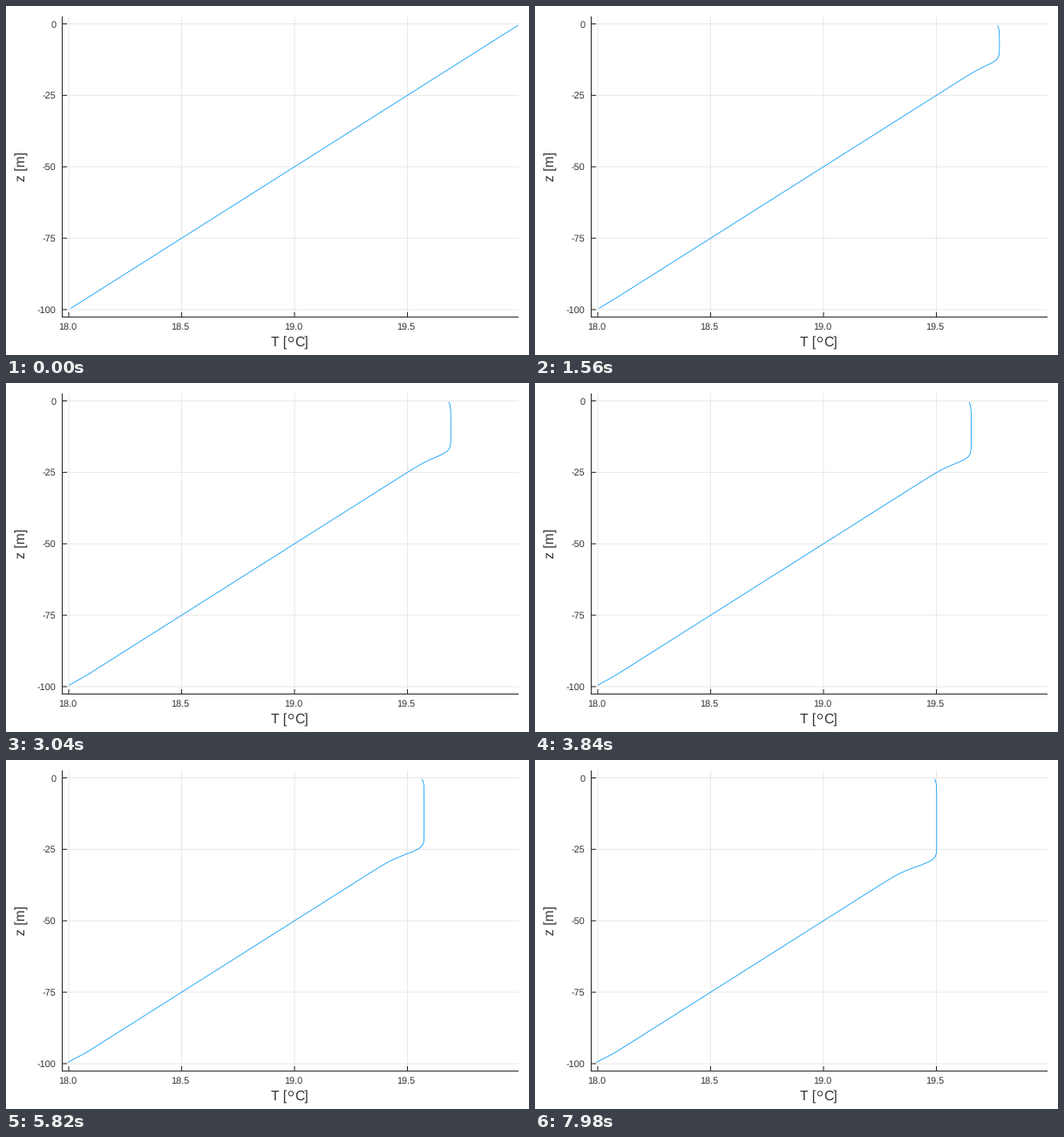
A matplotlib script for the animation above (8 s loop, 600 by 400 pixels).

```python
import numpy as np
import matplotlib.pyplot as plt
from matplotlib.animation import FuncAnimation
from matplotlib.patches import Circle

W, H, DPI = 600, 400, 100
FRAMES, STEP = 400, 20
PX = 72 / DPI                      # points per pixel
LEFT, RIGHT, TOP, BASE = 64.5, 588, 12, 356.5
GRAD = 5.18                        # pixels of temperature per metre
INK, TEXT, GRID = "#262626", "#333333", "#e8e8e8"

plt.rcParams["font.family"] = "Liberation Sans"
plt.rcParams["text.hinting"] = "none"
fig = plt.figure(figsize=(W / DPI, H / DPI), dpi=DPI, facecolor="white")
ax = fig.add_axes([0, 0, 1, 1])
ax.set_xlim(0, W)
ax.set_ylim(H, 0)
ax.axis("off")


def x_pos(temp):
    return 72 + (temp - 18) * 259


def y_pos(depth):
    return 20.5 + depth * 3.275


def stroke(xs, ys, color=INK, z=2):
    ax.plot(xs, ys, color=color, lw=PX, zorder=z, snap=False,
            solid_capstyle="butt")


def label(x, y, text, size, **kw):
    ax.text(x, y, text, fontsize=size * PX, color=TEXT, **kw)


for temp in (18, 18.5, 19, 19.5):
    x = x_pos(temp)
    stroke([x, x], [TOP, BASE], GRID, 1)
    stroke([x, x], [BASE, BASE - 5.5])
    label(x - 1.7, 370.6, f"{temp:.1f}", 10.9, ha="center", va="baseline")

for depth in range(0, 101, 25):
    y = y_pos(depth)
    stroke([LEFT, RIGHT], [y, y], GRID, 1)
    stroke([LEFT, LEFT + 5.5], [y, y])
    label(57.5, y + 4, f"{-depth}", 10.9, ha="right", va="baseline")

stroke([LEFT, LEFT], [TOP, BASE + 0.5])
stroke([LEFT, RIGHT], [BASE, BASE])

# The degree ring is drawn as a circle between the two text parts.
label(304, 390, "T [", 15.7, ha="left", va="baseline")
label(331.3, 390, "C]", 15.7, ha="left", va="baseline")
ax.add_patch(Circle((327, 382.3), 2.7, fill=False, ec=TEXT, lw=PX))
label(21.6, 184, "z [m]", 15.7, ha="center", va="baseline",
      rotation=90, rotation_mode="anchor")

depths = np.arange(100) + 0.5
linear = x_pos(20) - GRAD * depths
curve, = ax.plot([], [], color="#009afa", lw=0.8 * PX, zorder=3)


def bend(d, width):
    """Smooth ramp: 0 for d << 0, d for d >> 0."""
    return width * np.logaddexp(0, d / width)


def profile(t):
    if t == 0:
        return linear
    drop = 1.446 * np.sqrt(t)
    mixed = drop / GRAD
    corner = 1.143 * mixed + 0.45
    foot = 1.25 * mixed + 1.15
    slope = GRAD * (foot - mixed) / (foot - corner)
    soft = min(1, mixed / 6)

    x = x_pos(20) - drop - slope * bend(depths - corner, 0.85 * soft)
    x += (slope - GRAD) * bend(depths - foot, soft)
    x -= 2.1 * np.exp(-(depths - 0.5) / 1.3)            # cooled surface
    cooling = 4 * (1 - np.exp(-(t / 4000) ** 1.5))      # cooled bottom
    x -= cooling * np.exp(-((99.5 - depths) / 2.1) ** 2)
    return x


def draw(i):
    curve.set_data(profile(i * STEP), y_pos(depths))
    return curve,


anim = FuncAnimation(fig, draw, frames=FRAMES, interval=STEP,
                     repeat=True, repeat_delay=0, blit=False)
plt.show()
```
